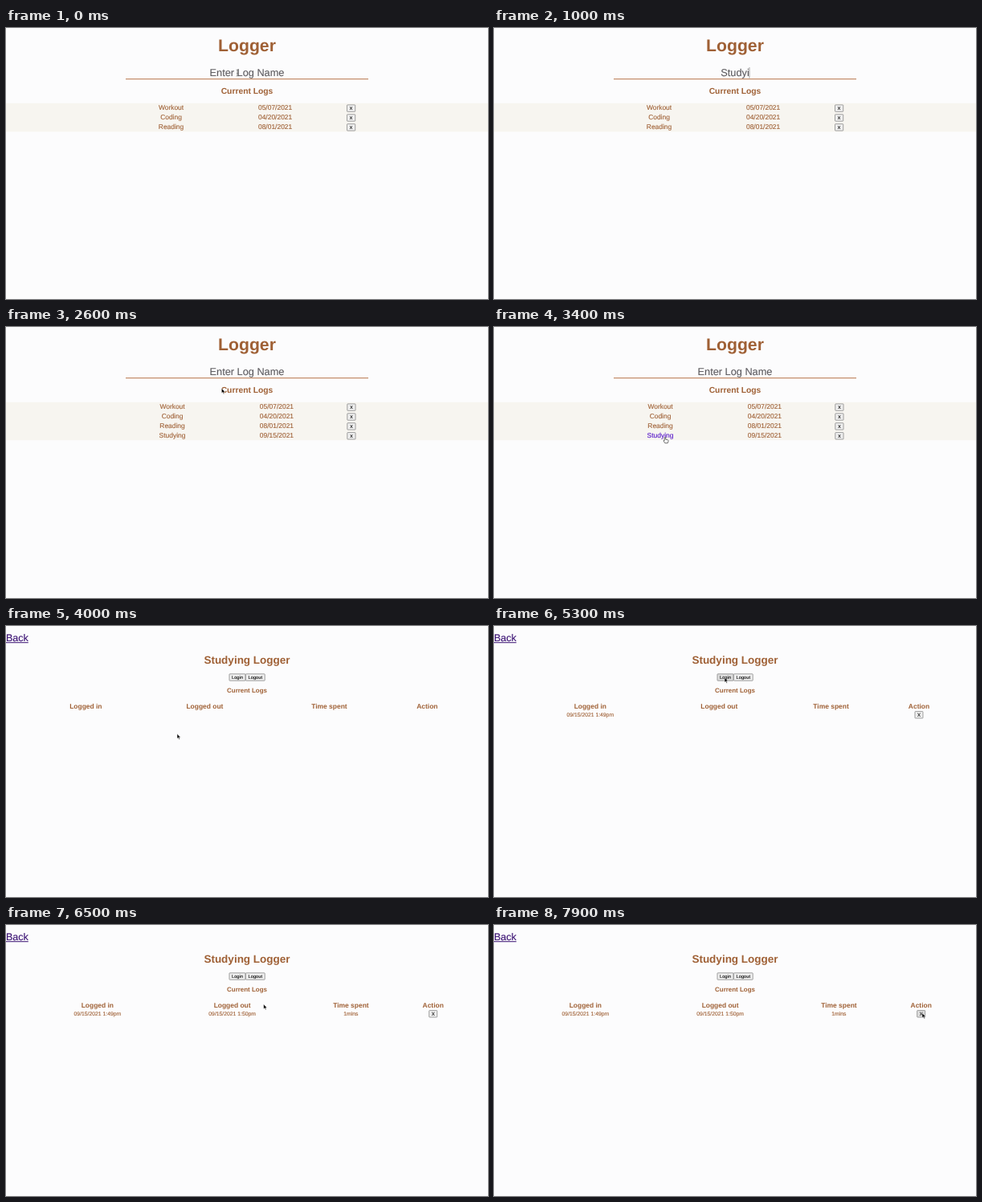
Recreate the animation shown at these times as an HTML page. Size 600 by 338 pixels, loop 8 s.

```html
<!DOCTYPE html>
<html lang="en">
<head>
<meta charset="utf-8">
<title>Logger</title>
<style>
  html, body { margin: 0; height: 100%; overflow: hidden; background: #fcfcfd; }
  svg { display: block; width: 100vw; height: 100vh; }
  text { font-family: "Liberation Sans", Arial, sans-serif; text-anchor: middle; text-rendering: geometricPrecision; stroke-width: .12; }
</style>
</head>
<body>
<svg id="stage" viewBox="0 0 600 338"></svg>
<script>
const LOOP = 8000;
const FOCUS = 100, TYPE = 200, SUBMIT = 2100, OPEN = 3500, LOGIN = 4900, LOGOUT = 5900;
const KEY_INTERVAL = 145, CARET_BLINK = 366;
const BROWN = '#9f6035', GREY = '#5c5a5e', VIOLET = '#5514c8', INDIGO = '#3a1173';
const CENTER = 300, WORD = 'Studying';
const stage = document.getElementById('stage');
const ruler = document.createElement('canvas').getContext('2d');

const REST = { x: 288, y: 56 };
const MOVES = [
  { from: 2400, to: 3000, x: 213, y: 134.5 },
  { from: 4000, to: 4600, x: 287, y: 64.3 },
  { from: 5300, to: 5700, x: 310, y: 64 },
  { from: 6300, to: 6500, x: 320.6, y: 98.8 },
  { from: 6500, to: 7100, x: 522, y: 141 },
  { from: 7200, to: 7600, x: 533, y: 109.8 }
];

function pointerAt(t) {
  return MOVES.reduce((pos, move) => {
    const k = Math.min(1, Math.max(0, (t - move.from) / (move.to - move.from)));
    const ease = k * k * (3 - 2 * k);
    return { x: pos.x + (move.x - pos.x) * ease, y: pos.y + (move.y - pos.y) * ease };
  }, REST);
}

function measure(str, size, weight = 400) {
  ruler.font = `${weight} 100px "Liberation Sans", Arial, sans-serif`;
  return ruler.measureText(str).width * size / 100;
}

function text(str, x, y, size, fill = BROWN, weight = 400) {
  const stroke = weight === 400 ? fill : 'none';
  return `<text x="${x}" y="${y}" font-size="${size}" fill="${fill}" stroke="${stroke}" font-weight="${weight}">${str}</text>`;
}
const bold = (str, x, y, size) => text(str, x, y, size, BROWN, 700);
const rect = (x, y, w, h, fill) => `<rect x="${x}" y="${y}" width="${w}" height="${h}" fill="${fill}"/>`;

// Button centred on x, y
function button(label, x, y, w, size, mouse) {
  const h = 8.4;
  const hover = Math.abs(mouse.x - x) < w / 2 + 1 && Math.abs(mouse.y - y) < h / 2 + 1;
  return `<rect x="${x - w / 2}" y="${y - h / 2}" width="${w}" height="${h}" rx=".6"
    fill="${hover ? '#dedede' : '#efefef'}" stroke="#7a7a7a" stroke-width=".7"/>`
    + text(label, x, y + size * .34, size, '#111');
}

// Column centres of a centred table: widths follow the widest content
function columnCenters(contentWidths, tableWidth) {
  const padded = contentWidths.map(w => w + .9);
  const scale = tableWidth / padded.reduce((a, b) => a + b);
  let left = CENTER - tableWidth / 2;
  return padded.map(w => {
    left += w * scale;
    return left - w * scale / 2;
  });
}

const POINTERS = {
  beam: `<path d="M-1.3-4Q0-4 0-3Q0-4 1.3-4M0-3V3M-1.3 4Q0 4 0 3Q0 4 1.3 4M-1 .8H1" fill="none" stroke="#777" stroke-width=".8"/>`,
  arrow: `<path d="M0 0V6L1.4 4.8L2.4 7L3.4 6.6L2.5 4.4H4.3Z" fill="#000" stroke="#fff" stroke-width=".5"/>`,
  hand: `<path d="M-.8 3.3Q0 2.3 .7 3.3V5.7L3.4 6.3Q4.2 6.7 4 7.9L3.2 10.3H-.2L-2 7.5Q-2 6.5-.8 7.1Z" fill="#fff" stroke="#333" stroke-width=".7"/>`
};

function inputField(t) {
  const size = 12.75;
  const count = Math.min(WORD.length, Math.max(0, Math.floor((t - TYPE) / KEY_INTERVAL) + 1));
  const submitted = t >= SUBMIT, empty = t < FOCUS || submitted;
  const typed = submitted ? '' : WORD.slice(0, count);
  const lastEdit = submitted ? SUBMIT : count ? TYPE + (count - 1) * KEY_INTERVAL : FOCUS;
  const caretOn = t >= FOCUS && Math.floor((t - lastEdit) / CARET_BLINK) % 2 === 0;
  return text(empty ? 'Enter Log Name' : typed, CENTER, 60, size, GREY)
    + (caretOn ? rect(CENTER - .1 + measure(typed, size) / 2, 49, .7, 13.5, '#777') : '')
    + rect(149, 63.1, 302, 1.1, '#bd8059');
}

function listPage(t, mouse) {
  const size = 8.45, rowHeight = 11.9;
  const rows = [['Workout', '05/07/2021'], ['Coding', '04/20/2021'], ['Reading', '08/01/2021']];
  if (t >= SUBMIT) rows.push([WORD, '09/15/2021']);
  const widest = col => Math.max(...rows.map(row => measure(row[col], size)));
  const [nameX, dateX, buttonX] = columnCenters([widest(0), widest(1), 11], 300);
  const table = rows.map(([name, date], i) => {
    const y = 102.4 + i * rowHeight;
    const hover = name === WORD && mouse.y > 129;
    return text(name, nameX, y, size, hover ? VIOLET : BROWN) + text(date, dateX, y, size)
      + button('x', buttonX, y - 2.3, 10.2, 7, mouse);
  }).join('');
  return bold('Logger', CENTER, 29, 21.2) + inputField(t) + bold('Current Logs', CENTER, 82, 10.3)
    + rect(0, 93.7, 600, rows.length * rowHeight, '#f7f5f0') + table;
}

function logPage(t, mouse) {
  const headSize = 8.45, cellSize = 6.8;
  const started = t >= LOGIN, done = t >= LOGOUT;
  const headers = ['Logged in', 'Logged out', 'Time spent', 'Action'];
  const cells = [started ? '09/15/2021 1:49pm' : '', done ? '09/15/2021 1:50pm' : '', done ? '1mins' : '', ''];
  const columns = columnCenters(headers.map((head, i) =>
    Math.max(measure(head, headSize, 700), measure(cells[i], cellSize))), 540);
  return text('Back', 13.8, 19.3, 12.5, INDIGO) + rect(0, 20.2, 27.8, 1, INDIGO)
    + bold('Studying Logger', CENTER, 47.3, 13.5)
    + button('Login', 288, 64, 20, 5.75, mouse)
    + button('Logout', 310.3, 64, 23.8, 5.75, mouse)
    + bold('Current Logs', CENTER, 83.3, 7.95)
    + headers.map((head, i) => bold(head, columns[i], 102.5, headSize) + text(cells[i], columns[i], 112.9, cellSize)).join('')
    + (started ? button('X', columns[3], 110.8, 10, 6, mouse) : '');
}

function render(t) {
  const mouse = pointerAt(t);
  const onList = t < OPEN;
  const hidden = t >= FOCUS && t < MOVES[0].from;
  const kind = !onList ? 'arrow' : mouse.y < 64 ? 'beam' : mouse.y > 129 ? 'hand' : 'arrow';
  stage.innerHTML = (onList ? listPage : logPage)(t, mouse)
    + (hidden ? '' : `<g transform="translate(${mouse.x} ${mouse.y})">${POINTERS[kind]}</g>`);
}

const start = performance.now();
function tick() {
  render((performance.now() - start) % LOOP);
  requestAnimationFrame(tick);
}
tick();
</script>
</body>
</html>
```
